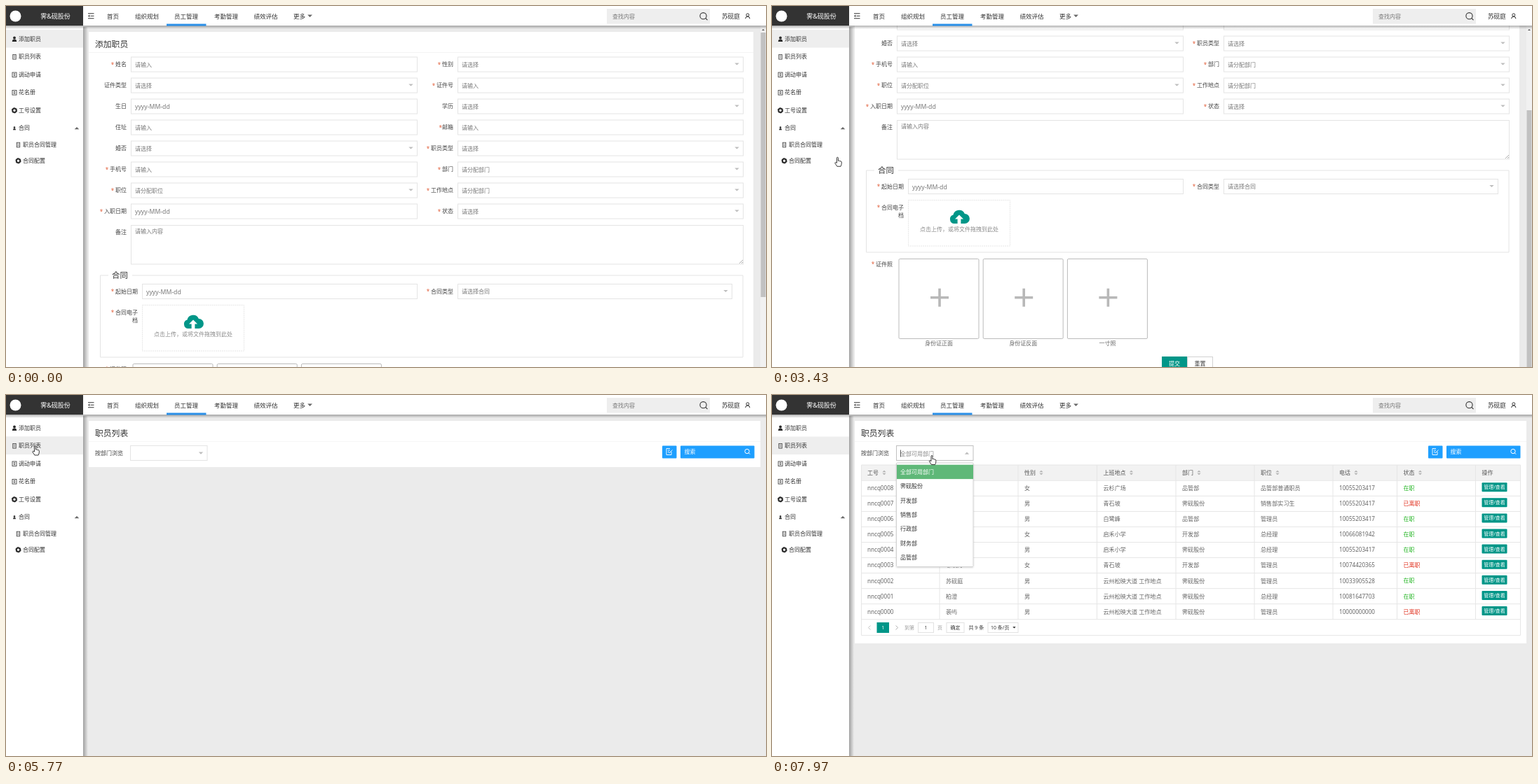
An HTML page that plays this animation: 1084x516 px, repeating every 8000 ms.

```html
<!DOCTYPE html>
<html>
<head>
<meta charset="utf-8">
<style>
html, body { margin: 0; width: 100%; height: 100%; overflow: hidden; background: #ebebeb; }
svg { display: block; width: 1084px; height: 516px; }
text { font-family: "Noto Sans", "Noto Sans CJK SC", "Noto Sans CJK", sans-serif; white-space: pre; }
</style>
</head>
<body>
<svg id="stage" viewBox="0 0 1084 516" xmlns="http://www.w3.org/2000/svg"></svg>
<script>
const LOOP = 8000;
const INK = '#444', HINT = '#787878', LINE = '#e4e4e4', TEAL = '#009688', BLUE = '#1e9fff';

// Drawing helpers; text is placed by its vertical centre.
const rect = (x, y, w, h, fill, stroke = 'none', extra = '') =>
  `<rect x="${x}" y="${y}" width="${w}" height="${h}" fill="${fill}" stroke="${stroke}" ${extra}/>`;
const text = (s, x, y, size = 8, fill = INK, anchor = 'start') =>
  `<text x="${x}" y="${y + size * .36}" font-size="${size}" fill="${fill}" text-anchor="${anchor}">${s}</text>`;
const path = (d, fill = 'none', stroke = 'none', width = 1) =>
  `<path d="${d}" fill="${fill}" stroke="${stroke}" stroke-width="${width}"/>`;
const circle = (x, y, r, fill, stroke = 'none', width = 1) =>
  `<circle cx="${x}" cy="${y}" r="${r}" fill="${fill}" stroke="${stroke}" stroke-width="${width}"/>`;
const tri = (x, y, up, w = 3.2, fill = '#bdbdbd') => {
  const s = up ? -1 : 1;
  return path(`M${x - w} ${y - s * w / 2}H${x + w}L${x} ${y + s * w / 2}Z`, fill);
};
const group = (id, body, extra = '') => `<g id="${id}" ${extra}>${body}</g>`;
const lens = (x, y, r, color, w) =>
  circle(x, y, r, 'none', color, w) +
  path(`M${x + r * .7} ${y + r * .7}l${r * .6} ${r * .6}`, 'none', color, w);

function label(s, x, y) {
  const star = s[0] === '*', tight = s[1] !== ' ';
  const word = star ? s.slice(tight ? 1 : 2) : s;
  return text(word, x, y, 8, INK, 'end') +
    (star ? text('*', x - word.length * 8 - (tight ? 0 : 1.8), y + .6, 8, '#e2603c', 'end') : '');
}

function field(name, hint, x, y, w, right) {
  const date = hint[0] === 'y', select = hint[1] === '选' || hint[1] === '分';
  return label(name, right, y) + rect(x + .5, y - 10.5, w - 1, 21, '#fff', LINE) +
    text(hint, x + 6, y + .5, date ? 8.7 : 8, HINT) +
    (select ? tri(x + w - 9.5, y - .5) : '');
}

function cloud(x, y) {
  return path(`M${x - 8} ${y + 9}a6.4 6.4 0 0 1 -.5 -12.4a8.6 8.6 0 0 1 16.4 -1.6a7 7 0 0 1 0 14Z`, TEAL) +
    path(`M${x} ${y - 3.5}l6 6h-3.6v6.5h-4.8v-6.5h-3.6Z`, '#fff');
}

function formPage() {
  const rows = [
    ['* 姓名', '请输入', '* 性别', '请选择'],
    ['证件类型', '请选择', '* 证件号', '请输入'],
    ['生日', 'yyyy-MM-dd', '学历', '请选择'],
    ['住址', '请输入', '*邮箱', '请输入'],
    ['婚否', '请选择', '* 职员类型', '请选择'],
    ['* 手机号', '请输入', '* 部门', '请分配部门'],
    ['* 职位', '请分配职位', '* 工作地点', '请分配部门'],
    ['* 入职日期', 'yyyy-MM-dd', '* 状态', '请选择']
  ];
  let s = rect(118, 37, 948, 700, '#fff') + text('添加职员', 127, 55, 11.8, '#333') +
    rect(118, 66, 948, 1, '#f4f4f4');
  rows.forEach((r, i) => {
    const y = 83.5 + 30 * i;
    s += field(r[0], r[1], 178, y, 409, 172) + field(r[2], r[3], 644, y, 408, 638);
  });
  s += label('备注', 172, 323.5) + rect(178.5, 313.5, 873, 55.5, '#fff', LINE) +
    text('请输入内容', 184, 322, 8, HINT) +
    path('M1046 368l5 -5M1049 368l2 -2', 'none', '#999', .8);
  s += path('M146 385H134.5V502H1051V385H180', 'none', LINE) + text('合同', 151, 384.5, 11.4, '#333') +
    field('* 起始日期', 'yyyy-MM-dd', 194, 408, 393, 188) +
    field('* 合同类型', '请选择合同', 644, 408, 392, 638) +
    label('* 合同电子', 188, 438) + label('档', 188, 449.5) +
    rect(194.5, 427.5, 145, 65.5, '#fff', '#e6e6e6', 'stroke-dasharray="2 1"') +
    cloud(267, 452) + text('点击上传，或将文件拖拽到此处', 211, 469, 8, '#8c8c8c');
  s += label('* 证件照', 172, 519);
  ['身份证正面', '身份证反面', '一寸照'].forEach((name, i) => {
    const x = 181 + 120.2 * i;
    s += rect(x, 511.5, 114, 114, '#fff', '#bbb', 'rx="1.5"') +
      path(`M${x + 45} 566.8h26M${x + 58} 553.8v26`, 'none', '#b8b8b8', 3.6) +
      text(name, x + 57, 632.5, 8, '#666', 'middle');
  });
  return s + rect(592.5, 651.5, 36, 21, '#fff', '#d2d2d2') + rect(556, 651, 36, 22, TEAL) +
    text('提交', 574, 661.5, 8, '#fff', 'middle') + text('重置', 610.5, 661.5, 8, INK, 'middle');
}

const cols = [127, 239, 351, 463.5, 576, 688, 800, 891.5, 1003.5, 1068];
const heads = ['工号', '名字', '性别', '上班地点', '部门', '职位', '电话', '状态', '操作'];
const firm = '霁砚股份', road = '云州松映大道 工作地点';
const staff = [
  ['柯岚', '女', '云杉广场', '品管部', '品管部普通职员', '10055203417', 1],
  ['小禾', '男', '青石坡', firm, '销售部实习生', '10055203417', 0],
  ['祁川', '男', '白鹭峰', '品管部', '管理员', '10055203417', 1],
  ['邵棠', '女', '启禾小学', '开发部', '总经理', '10066081942', 1],
  ['祁川', '男', '启禾小学', firm, '总经理', '10055203417', 1],
  ['邬映舟', '女', '青石坡', '开发部', '管理员', '10074420365', 0],
  ['苏砚庭', '男', road, firm, '管理员', '10033905528', 1],
  ['柏澄', '男', road, firm, '总经理', '10081647703', 1],
  ['裴屿', '男', road, firm, '管理员', '10000000000', 0]
];

function pager() {
  const y = 332.5, box = (x, w) => rect(x + .5, 325.5, w - 1, 14, '#fff', '#e2e2e2');
  return path('M140.5 329.5l-3 3 3 3', 'none', '#c4c4c4') + rect(149.5, 325, 17.5, 15, TEAL) +
    text('1', 158.3, y, 7, '#fff', 'middle') + path('M176.5 329.5l3 3 -3 3', 'none', '#b0b0b0') +
    text('到第', 189, y, 7, '#999') + box(208, 23) + text('1', 219.5, y, 7, INK, 'middle') +
    text('页', 236, y, 7, '#999') + box(248.5, 26) + text('确定', 261.5, y, 7, '#333', 'middle') +
    text('共 9 条', 280.5, y, 7, '#333') + box(307.5, 44) + text('10 条/页', 312, y, 7, '#333') +
    tri(345.5, 332.3, false, 2.2, '#222');
}

function table() {
  let s = rect(127, 100, 941, 22, '#f2f2f2');
  heads.forEach((h, i) => {
    const x = cols[i] + 9, a = x + h.length * 8 + 8;
    s += text(h, x, 111, 8, '#555');
    if (i < 8) s += tri(a, 109, true, 2.6, '#b2b2b2') + tri(a, 113, false, 2.6, '#b2b2b2');
  });
  staff.forEach((p, i) => {
    const y = 133 + 22.1 * i;
    const cells = ['nncq000' + (8 - i), ...p.slice(0, 6)];
    cells.forEach((c, k) => s += text(c, cols[k] + 9, y, 8.1, '#666'));
    s += text(p[6] ? '在职' : '已离职', 900.5, y, 8, p[6] ? '#22b522' : '#e0301e') +
      rect(1012.5, y - 7.8, 36, 13, TEAL, 'none', 'rx="1"') +
      text('管理/查看', 1030.5, y - 1.3, 7, '#fff', 'middle');
  });
  let d = 'M127.5 100V343.5H1067.5V100Z';
  for (let i = 0; i < 10; i++) d += `M127 ${122.3 + 22.05 * i}H1068`;
  cols.slice(1, 9).forEach(x => d += `M${x} 100V320.8`);
  return s + path(d, 'none', '#e6e6e6') + pager();
}

function listPage() {
  const depts = ['全部可用部门', firm, '开发部', '销售部', '行政部', '财务部', '品管部'];
  let menu = rect(177.5, 97, 109.5, 148.5, '#fff', '#d2d2d2', 'rx="1" filter="url(#soft)"') +
    rect(178, 99.7, 109, 20.4, '#5fb878');
  depts.forEach((d, i) => menu += text(d, 183, 110 + 20.35 * i, 8, i ? '#333' : '#fff'));
  return '<rect id="panel" x="118" y="37" width="958" height="318" fill="#fff"/>' +
    text('职员列表', 127, 55, 11.8, '#333') + rect(118, 66, 958, 1, '#f6f6f6') +
    text('按部门浏览', 127, 83.5) +
    '<rect id="box" x="177.5" y="72.5" width="109.5" height="21" fill="#fff"/>' +
    rect(936, 72.5, 20.5, 18, BLUE, 'none', 'rx="1"') +
    path('M949 81v4.5h-7v-9h5M944 79h3M944 81.5h2M945.5 83.5l5 -5', 'none', '#fff', .9) +
    rect(962, 72.5, 105.5, 18, BLUE, 'none', 'rx="1"') + text('搜索', 967.5, 81.5, 8, '#fff') +
    lens(1057, 80.5, 3.2, '#fff', 1) +
    group('loaded', text('全部可用部门', 183, 84, 8, '#888') + table()) +
    group('down', tri(278, 83.2, false)) +
    group('up', tri(278, 83.2, true) + rect(183, 78.5, .8, 10, '#333')) +
    group('menu', menu);
}

function icon(kind, x, y) {
  if (kind === 'gear') return circle(x, y, 2.7, 'none', '#2b2b2b', 2) +
    `<circle cx="${x}" cy="${y}" r="3.6" fill="none" stroke="#2b2b2b" stroke-width="1" stroke-dasharray="2 1.77"/>`;
  if (kind === 'man') return circle(x, y - 1.8, 1.9, '#2b2b2b') +
    path(`M${x - 3.2} ${y + 3.6}q0 -3.4 3.2 -3.4t3.2 3.4Z`, '#2b2b2b');
  if (kind === 'mini') return circle(x, y - 1.2, 1.3, '#2b2b2b') +
    path(`M${x - 2} ${y + 2.4}q0 -2.3 2 -2.3t2 2.3Z`, '#2b2b2b');
  const w = kind === 'card' ? 3 : 2.2;
  return rect(x - w, y - 3.3, 2 * w, 6.6, 'none', '#444', 'stroke-width=".9"') +
    path(`M${x - 1.2} ${y - 1.2}h2.4M${x - 1.2} ${y + 1}h2.4`, 'none', '#444', kind === 'card' ? 1.3 : .7);
}

function sidebar() {
  const items = [['man', '添加职员'], ['doc', '职员列表'], ['card', '调动申请'],
    ['card', '花名册'], ['gear', '工号设置'], ['mini', '合同']];
  let s = rect(110, 30, 7, 486, 'url(#side)') + rect(0, 28, 110, 488, '#fff') +
    '<rect id="active" width="110" height="25.5" fill="#eee"/>' +
    '<rect id="hover" width="110" height="25.5" fill="#eee"/>';
  items.forEach(([k, name], i) => {
    const y = 47 + 25.5 * i;
    s += icon(k, 12, y + .3) + text(name, 18, y, 8, '#333');
  });
  return s + tri(101, 174.7, true, 3.3, '#666') +
    icon('doc', 17.5, 198.5) + text('职员合同管理', 24, 198.5, 8, '#333') +
    icon('gear', 17.5, 221.3) + text('合同配置', 24, 221.3, 8, '#333');
}

function topbar() {
  const nav = [['首页', 144], ['组织规划', 184], ['员工管理', 240], ['考勤管理', 297], ['绩效评估', 353.5], ['更多', 410]];
  let s = rect(0, 28, 1084, 5, 'url(#drop)') + rect(0, 0, 1084, 28, '#fff') + rect(0, 0, 110, 28, '#333') +
    circle(13.5, 14.5, 8, '#fff') + text('霁&amp;砚股份', 70.5, 14.5, 9, '#fff', 'middle') +
    path('M117 10.7h8.5M120.5 14.2h5M117 17.7h8.5', 'none', '#333', 1.1) +
    path('M119.3 12.4v3.6l-2.3 -1.8Z', '#333');
  nav.forEach(([name, x]) => s += text(name, x, 14.5, 8.5, '#333'));
  return s + tri(433.5, 14.3, false, 3.4, '#666') + rect(229, 25.5, 56.5, 3, '#2b90e8') +
    rect(857, 4, 147, 21.5, '#eee') + text('查找内容', 865, 15, 8, '#777') + lens(994.5, 14.2, 4.6, '#333', 1.1) +
    text('苏砚庭', 1021, 14.5, 8.6, '#333') + circle(1057.8, 12.8, 2, 'none', '#333') +
    path('M1054.7 18.2q0 -3.2 3.1 -3.2t3.1 3.2', 'none', '#333');
}

const stage = document.getElementById('stage');
stage.innerHTML = `<defs>
  <linearGradient id="drop" x2="0" y2="1"><stop stop-color="#000" stop-opacity=".3"/><stop offset="1" stop-color="#000" stop-opacity="0"/></linearGradient>
  <linearGradient id="side"><stop stop-color="#000" stop-opacity=".32"/><stop offset="1" stop-color="#000" stop-opacity="0"/></linearGradient>
  <filter id="soft"><feDropShadow dx="0" dy="1" stdDeviation="1.2" flood-opacity=".15"/></filter>
  </defs>` + rect(0, 0, 1084, 516, '#ebebeb') +
  group('form', group('scroll', formPage()) + rect(1076, 28, 8, 488, '#f1f1f1') +
    '<rect id="thumb" x="1076.5" width="7" height="378" fill="#c1c1c1"/>' + tri(1080, 34, true, 2, '#505050')) +
  group('list', listPage()) + sidebar() + topbar() +
  group('arrow', path('M0 0V9.6L2.2 7.6 3.7 11 5.2 10.3 3.8 7H6.8Z', '#fff', '#222', .8)) +
  group('hand', path('M-1 1Q-1 0 0 0T1 1V5Q3 4.6 3.2 5.4 5.6 5.2 5.8 6.8V9Q5.6 11 4.6 13H-.6Q-2.5 10 -3.8 8 -3.4 6.4 -1 8Z', '#fff', '#222', .9)) +
  group('ring', circle(0, 0, 5.5, 'none', '#3d9fe0', 2.4));

const el = {};
stage.querySelectorAll('[id]').forEach(e => el[e.id] = e);
const show = (id, on) => el[id].setAttribute('display', on ? 'inline' : 'none');
const move = (id, x, y) => el[id].setAttribute('transform', `translate(${x} ${y})`);

// Keys are [time, values...]; values run linearly between keys.
function at(keys, t) {
  let i = keys.findIndex(k => k[0] > t);
  if (i < 0) return keys[keys.length - 1].slice(1);
  if (i === 0) return keys[0].slice(1);
  const a = keys[i - 1], b = keys[i], p = (t - a[0]) / (b[0] - a[0]);
  return a.slice(1).map((v, k) => v + (b[k + 1] - v) * p);
}

const scrollKeys = [[180, 0], [350, 20], [600, 68], [850, 118], [990, 134], [1060, 135], [1920, 135], [2040, 150]];
const pointerKeys = [
  [0, 561, 273], [1920, 561, 273], [2050, 489, 274], [2680, 480, 272], [2800, 452, 258], [2970, 421, 272],
  [3180, 421, 272], [3300, 220, 240], [3430, 93.5, 216.5], [3700, 74, 150], [4000, 60.5, 107],
  [4250, 48, 88], [4570, 41.5, 75], [4720, 41.5, 75], [4780, 41.5, 73], [6340, 41.5, 73],
  [6550, 86, 100], [6750, 150, 104], [6980, 230, 92], [7150, 225, 81], [7400, 228, 86.5]
];

function draw(t) {
  const listed = t >= 5770, loaded = t >= 6060, open = t >= 7910;
  const [scroll] = at(scrollKeys, t), [x, y] = at(pointerKeys, t);
  show('form', !listed);
  show('list', listed);
  move('scroll', 0, -scroll);
  el.thumb.setAttribute('y', 38 + scroll * .74);

  show('loaded', loaded);
  el.panel.setAttribute('height', loaded ? 318 : 66);
  el.box.setAttribute('stroke', open ? '#c0c0c0' : LINE);
  show('down', !open);
  show('up', open);
  show('menu', open);
  el.menu.setAttribute('opacity', t < 7970 ? .5 : 1);

  const row = Math.floor((y - 34) / 25.5);
  el.active.setAttribute('y', listed ? 59.5 : 34);
  show('hover', x < 110 && row >= 0 && row < 5);
  el.hover.setAttribute('y', 34 + 25.5 * row);

  const waiting = t >= 4940 && t < 5080;
  const hidden = t < 990 || (t >= 1450 && t < 1970) || (t >= 4940 && t < 5430);
  const link = x < 110 || (listed && x > 177 && y < 95);
  show('ring', waiting);
  show('hand', !hidden && link);
  show('arrow', !hidden && !link);
  ['ring', 'hand', 'arrow'].forEach(id => move(id, x, y));
}

const start = performance.now();
function tick() {
  draw((performance.now() - start) % LOOP);
  requestAnimationFrame(tick);
}
tick();
</script>
</body>
</html>
```
